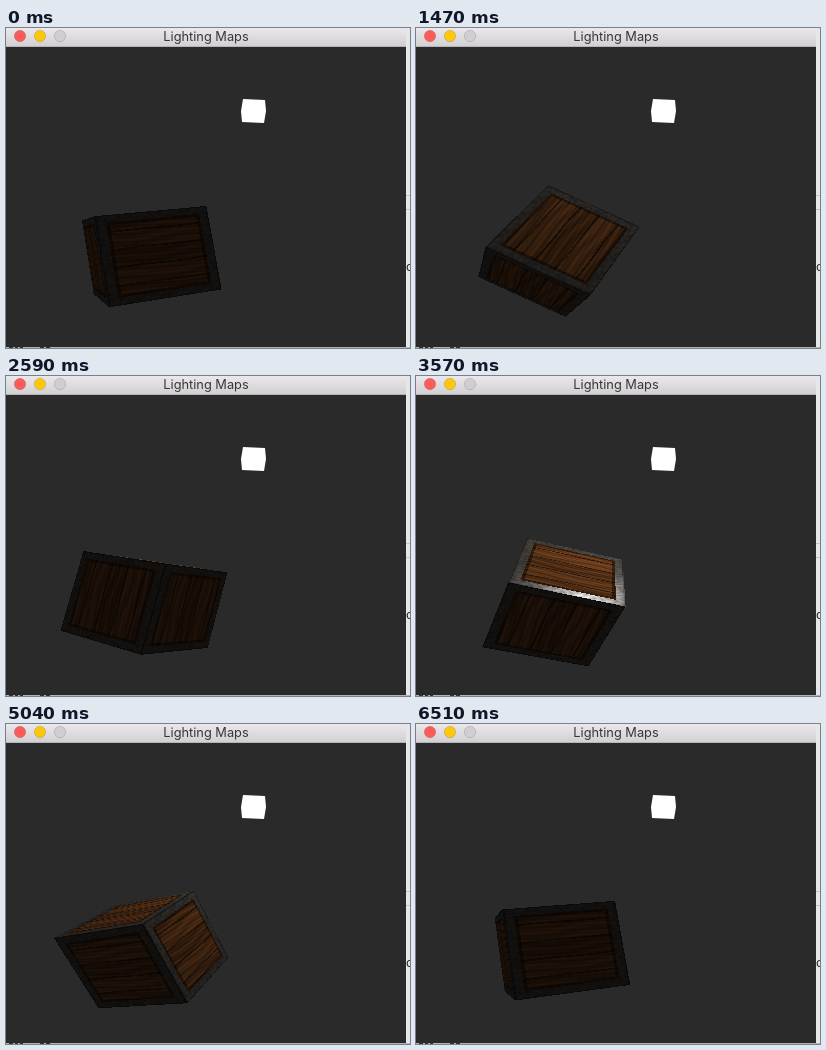
An HTML page with a canvas for the animation above (6580 ms loop, 404 by 320 pixels).

```html
<!DOCTYPE html>
<html lang="en">
<head>
<meta charset="utf-8">
<title>Lighting Maps</title>
<style>
html, body { margin: 0; width: 404px; height: 320px; overflow: hidden; }
canvas { display: block; }
</style>
</head>
<body>
<canvas width="404" height="320"></canvas>
<script>
const ctx = document.querySelector('canvas').getContext('2d');
const LOOP = 6580, STEP = 70, BACK = 42;
const FX = 483, FY = 362, CX = 200, CY = 168;      // projection
const eye = [0.565, 0.721, 4.62];                  // seen from the crate centre
const lamp = [1.06, 1.9, -0.25];
const AMBIENT = 0.17, DIFFUSE = 0.62;
const WOOD = [150, 86, 40], STEEL = [98, 92, 86];
const area = { x: 40, y: 140, w: 210, h: 165 };
const image = ctx.createImageData(area.w, area.h);

const dot = (a, b) => a[0] * b[0] + a[1] * b[1] + a[2] * b[2];
const cross = (a, b) => [
  a[1] * b[2] - a[2] * b[1],
  a[2] * b[0] - a[0] * b[2],
  a[0] * b[1] - a[1] * b[0]
];
const unit = a => a.map(v => v / Math.hypot(...a));

const spin = unit([0.764, 0.646, -0.014]);
const axisX = unit([-0.136, 0.99, -0.066]);
const axisZ = unit(cross(axisX, [0.344, 0.108, 0.934]));
const axes = [axisX, cross(axisZ, axisX), axisZ];

function rotate(v, angle) {
  const c = Math.cos(angle), s = Math.sin(angle);
  const side = cross(spin, v), along = dot(spin, v) * (1 - c);
  return v.map((n, i) => n * c + side[i] * s + spin[i] * along);
}

// Crate texture: steel frame around planks, u runs along the grain.
function texture(u, v) {
  const edge = 0.5 - Math.max(Math.abs(u), Math.abs(v));
  if (edge < 0.085) {
    const wear = 1 + 0.18 * Math.sin(u * 47 + 3 * Math.sin(v * 31)) * Math.sin(v * 53 + 2 * Math.sin(u * 23));
    return { base: STEEL, tone: edge < 0.012 ? wear * 0.6 : wear, metal: wear };
  }
  const plank = (v + 0.5) * 5 + 0.02 * Math.sin(u * 9);
  const row = Math.floor(plank);
  let tone = 0.95 + 0.1 * Math.sin(row * 2.4)
    + 0.14 * Math.sin(v * 61 + 1.5 * Math.sin(u * 7 + row))
    + 0.12 * Math.sin(v * 143 + u * 9);
  if (plank - row < 0.09) tone *= 0.5;
  if (edge < 0.115) tone *= 0.55;
  return { base: WOOD, tone, metal: 0 };
}

function shade(p, face, from, light) {
  const { base, tone, metal } = texture(p[face === 2 ? 0 : 2], p[face === 1 ? 0 : 1]);
  const sign = Math.sign(p[face]);
  const l = unit(light.map((n, i) => n - p[i]));
  const facing = Math.max(0, sign * l[face]);
  let glow = 0;
  if (metal && facing) {
    const bounce = l.map((n, i) => (i === face ? n : -n));
    const view = unit(from.map((n, i) => n - p[i]));
    glow = 165 * metal * Math.max(0, dot(bounce, view)) ** 24;
  }
  const lit = tone * (AMBIENT + DIFFUSE * facing);
  return base.map(c => c * lit + glow);
}

function drawCrate(angle) {
  const frame = axes.map(a => rotate(a, angle));
  const toCrate = v => frame.map(a => dot(a, v));
  const from = toCrate(eye), light = toCrate(lamp);
  let at = 0;
  for (let y = 0; y < area.h; y++) {
    for (let x = 0; x < area.w; x++) {
      const ray = toCrate([(area.x + x + 0.5 - CX) / FX, (CY - area.y - y - 0.5) / FY, -1]);
      let near = -Infinity, far = Infinity, face = 0;
      for (let i = 0; i < 3; i++) {
        const mid = -from[i] / ray[i], half = Math.abs(0.5 / ray[i]);
        if (mid - half > near) { near = mid - half; face = i; }
        far = Math.min(far, mid + half);
      }
      const color = near < far
        ? shade(from.map((n, i) => n + ray[i] * near), face, from, light)
        : [BACK, BACK, BACK];
      for (const c of color) image.data[at++] = c;
      image.data[at++] = 255;
    }
  }
  ctx.putImageData(image, area.x, area.y);
}

function box(color, x, y, w, h) {
  ctx.fillStyle = color;
  ctx.fillRect(x, y, w, h);
}

function drawWindow() {
  // desktop behind
  box('#e6e6e6', 400, 0, 4, 320);
  box('#c4c4c4', 400, 167, 4, 1);
  box('#c4c4c4', 400, 181, 4, 1);
  ctx.fillStyle = '#222';
  ctx.font = '12px Inter, sans-serif';
  ctx.fillText('c', 400, 243);
  box('#b4b4b4', 0, 319, 404, 1);
  for (const [x, w] of [[3, 4], [9, 3], [14, 3], [34, 4], [40, 4]]) box('#333', x, 319, w, 1);

  box(`rgb(${BACK},${BACK},${BACK})`, 0, 18, 400, 301);
  const bar = ctx.createLinearGradient(0, 0, 0, 18);
  bar.addColorStop(0, '#eae8ea');
  bar.addColorStop(1, '#d2d0d2');
  box(bar, 0, 0, 400, 18);
  box('#b6b4b6', 0, 18, 400, 1);
  ['#fc5b57', '#fdc70c', '#d0ced0'].forEach((color, i) => {
    ctx.beginPath();
    ctx.arc(14 + 20 * i, 8, 5.7, 0, 7);
    ctx.fillStyle = color;
    ctx.fill();
    ctx.strokeStyle = 'rgba(0,0,0,.13)';
    ctx.stroke();
  });
  ctx.fillStyle = '#383638';
  ctx.font = '12.8px Inter, sans-serif';
  ctx.textAlign = 'center';
  ctx.fillText('Lighting Maps', 200, 13);
  ctx.textAlign = 'left';

  // lamp
  ctx.fillStyle = '#fff';
  ctx.beginPath();
  for (const [x, y] of [[237, 71], [259, 72], [260, 83], [258, 95], [236, 94], [235, 83]]) ctx.lineTo(x, y);
  ctx.fill();
}

let shown = -1;
function tick() {
  const step = Math.floor(performance.now() % LOOP / STEP);
  if (step !== shown) {
    shown = step;
    drawCrate(step * STEP / LOOP * 2 * Math.PI);
  }
  requestAnimationFrame(tick);
}
drawWindow();
tick();
</script>
</body>
</html>
```
